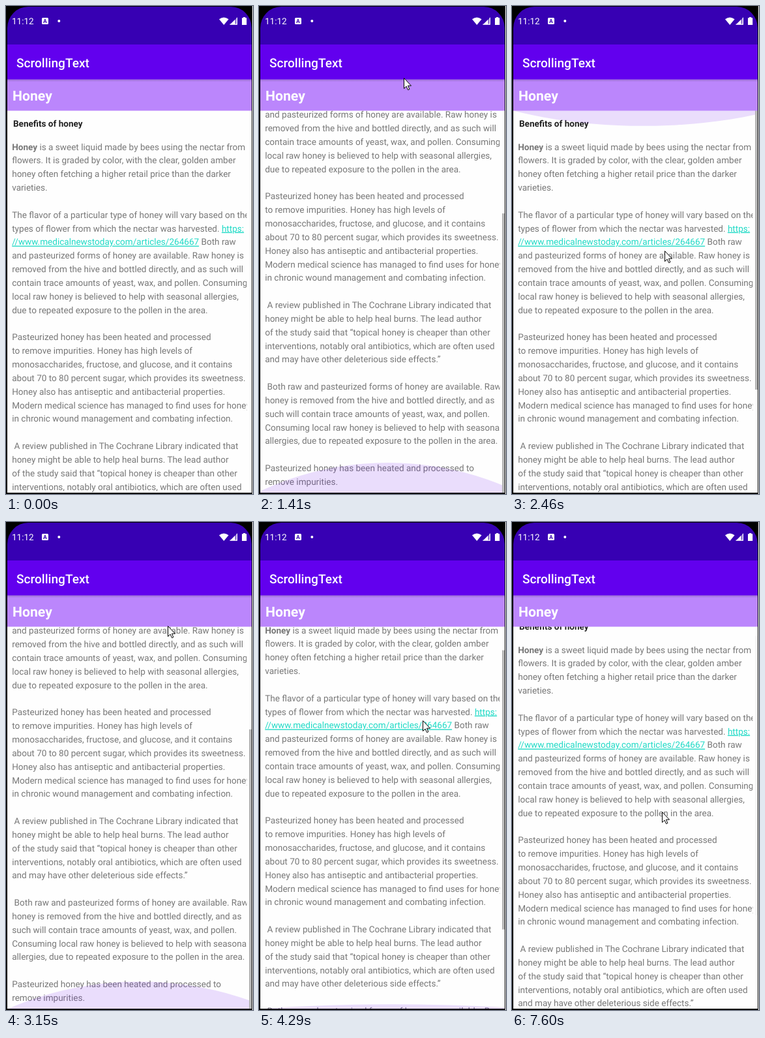
These frames come from a looping animation (379 by 748 pixels, 8 s). An HTML page:

```html
<!DOCTYPE html>
<html lang="en">
<head>
<meta charset="utf-8">
<title>ScrollingText</title>
<style>
  html, body { margin: 0; width: 100%; height: 100%; overflow: hidden; background: #fff; }
  svg { display: block; width: 379px; height: 748px; }
  text { font-family: Roboto, sans-serif; white-space: pre; text-rendering: geometricPrecision; }
  .body { font-size: 13.55px; fill: #777; }
  .bold { font-weight: 700; }
  .link { fill: #1fdac6; text-decoration: underline 1px; text-underline-offset: 1.2px; text-decoration-skip-ink: none; }
</style>
</head>
<body>
<svg viewBox="0 0 379 748">
  <defs>
    <clipPath id="view"><rect x="2" y="160" width="375" height="586"/></clipPath>
    <clipPath id="column"><rect x="2" y="0" width="367.4" height="1000"/></clipPath>
    <linearGradient id="shade" x2="0" y2="1">
      <stop offset="0" stop-opacity=".16"/><stop offset="1" stop-opacity="0"/>
    </linearGradient>
  </defs>
  <rect width="378" height="748"/>
  <rect x="2" y="100" width="375" height="646" fill="#fefefe"/>

  <g clip-path="url(#view)">
    <g id="content">
      <text class="bold" x="11" y="185" font-size="13.5" fill="#212121">Benefits of honey</text>
      <g id="lines" clip-path="url(#column)"></g>
    </g>
    <ellipse id="glow" rx="400" fill="#6200ee" opacity=".13"/>
    <rect id="bar" x="373" width="4" height="428" fill="#b5b5b5"/>
  </g>

  <path d="M2 60V34A32 33 0 0 1 34 1H345A32 33 0 0 1 377 34V60Z" fill="#3700b3"/>
  <rect x="2" y="59" width="375" height="54" fill="#6200ee"/>
  <rect x="2" y="112.5" width="375" height="48" fill="#bb86fc"/>
  <rect x="2" y="112.5" width="375" height="4" fill="url(#shade)"/>
  <g fill="#fff">
    <text x="9" y="28" font-size="13.5">11:12</text>
    <rect x="55" y="18" width="10" height="10" rx="1.5"/>
    <text x="57" y="26.2" font-size="8.5" font-weight="700" fill="#3700b3">A</text>
    <circle cx="81.3" cy="23" r="2"/>
    <path d="M327 20.3Q334.3 14.7 341.6 20.3L334.3 29Z"/>
    <path d="M343.5 28.8L355 17.3V28.8Z" fill-opacity=".35"/>
    <path d="M343.5 28.8L351.5 20.8V28.8ZM353.6 18.7L355 17.3V28.8H343.5V27.6H353.6Z"/>
    <path d="M362 18.3H364V17H367.2V18.3H369.2V29H362Z"/>
    <text x="16" y="94" font-size="19.1" font-weight="500">ScrollingText</text>
    <text class="bold" x="10" y="145" font-size="21.2">Honey</text>
  </g>

  <path id="cursor" d="M.5 .6V16.5L4.1 13.1L6.6 18.6L8.9 17.6L6.5 12.2H11.5Z"
        fill="#fff" stroke="#000" stroke-width="1"/>
</svg>
<script>
const LOOP = 8000, TICK = 138, LEAD = 35;   // screen refreshes once per tick
const TOP = 160, BOTTOM = 746, MAX = 216;
const PRESS = 8, RELEASE = 33;              // ticks between which the page is dragged
const $ = id => document.getElementById(id);
const clamp = (v, lo, hi) => Math.min(hi, Math.max(lo, v));

// *bold* and [link] mark runs inside a line
const copy = `*Honey* is a sweet liquid made by bees using the nectar from
flowers. It is graded by color, with the clear, golden amber
honey often fetching a higher retail price than the darker
varieties.

The flavor of a particular type of honey will vary based on the
types of flower from which the nectar was harvested. [https:]
[//www.medicalnewstoday.com/articles/264667] Both raw
and pasteurized forms of honey are available. Raw honey is
removed from the hive and bottled directly, and as such will
contain trace amounts of yeast, wax, and pollen. Consuming
local raw honey is believed to help with seasonal allergies,
due to repeated exposure to the pollen in the area.

Pasteurized honey has been heated and processed
to remove impurities. Honey has high levels of
monosaccharides, fructose, and glucose, and it contains
about 70 to 80 percent sugar, which provides its sweetness.
Honey also has antiseptic and antibacterial properties.
Modern medical science has managed to find uses for honey
in chronic wound management and combating infection.

 A review published in The Cochrane Library indicated that
honey might be able to help heal burns. The lead author
of the study said that “topical honey is cheaper than other
interventions, notably oral antibiotics, which are often used
and may have other deleterious side effects.”

 Both raw and pasteurized forms of honey are available. Raw
honey is removed from the hive and bottled directly, and as
such will contain trace amounts of yeast, wax, and pollen.
Consuming local raw honey is believed to help with seasonal
allergies, due to repeated exposure to the pollen in the area.

Pasteurized honey has been heated and processed to
remove impurities.`;

function add(parent, tag, attrs, text) {
  const el = document.createElementNS("http://www.w3.org/2000/svg", tag);
  set(el, attrs);
  if (text) el.textContent = text;
  return parent.appendChild(el);
}

function set(el, attrs) {
  for (const key in attrs) el.setAttribute(key, attrs[key]);
}

copy.split("\n").forEach((line, i) => {
  const row = add($("lines"), "text", { class: "body", x: 9.2, y: 220.6 + i * 20.84 });
  for (const run of line.match(/\*[^*]+\*|\[[^\]]+\]|[^*[]+/g) || []) {
    const kind = { "*": "bold", "[": "link" }[run[0]];
    add(row, "tspan", kind ? { class: kind } : {}, kind ? run.slice(1, -1) : run);
  }
});

// turning points of the pointer: tick, x, y
const path = [
  [3, 204, 599], [4, 204, 591], [8, 205, 582], [10, 222, 110], [12, 222, 106],
  [14, 222, 119], [21, 242, 537], [23, 248, 159], [25, 249, 124], [27, 249, 124],
  [31, 251, 304], [33, 250, 336.5], [37, 245, 347], [47, 245, 347],
  [50, 225, 524], [52, 225, 522], [55, 230, 444]
];

function pointer(tick) {
  const i = path.findLastIndex(p => p[0] <= tick);
  if (i < 0) return [0, -50];
  const a = path[i], b = path[i + 1] || a;
  const u = a === b ? 0 : (tick - a[0]) / (b[0] - a[0]);
  const ease = (1 - Math.cos(Math.PI * u)) / 2;
  return [1, 2].map(k => a[k] + (b[k] - a[k]) * ease);
}

// The page follows the pointer; pushing past an end feeds a glow that fades again.
function scroll(tick) {
  let offset = 0, glow = 0, side = 1;
  for (let k = PRESS + 1; k <= tick; k++) {
    const drag = k <= RELEASE ? .922 * (pointer(k - 1)[1] - pointer(k)[1]) : 0;
    const wanted = offset + drag;
    offset = clamp(wanted, 0, MAX);
    const over = wanted - offset;
    if (over) {
      if (Math.sign(over) !== side) glow = 0;
      side = Math.sign(over);
      glow += (1 - glow) * Math.abs(over) / (Math.abs(over) + 40);
    } else {
      glow = glow < .1 ? 0 : glow * .72;
    }
  }
  return { offset: Math.round(offset), glow, side };
}

function draw() {
  const tick = Math.floor((performance.now() % LOOP + LEAD) / TICK);
  const [x, y] = pointer(tick).map(Math.round);
  const { offset, glow, side } = scroll(tick);

  set($("cursor"), { transform: `translate(${x} ${y})` });
  set($("content"), { transform: `translate(0 ${-offset})` });
  set($("bar"), {
    y: TOP + offset * (BOTTOM - TOP) / (BOTTOM - TOP + MAX),
    opacity: tick > PRESS ? clamp(1 - .3 * (tick - RELEASE - 1), .1, 1) : 0
  });
  set($("glow"), {
    cx: 190 + (x - 190) / 4,
    cy: (side > 0 ? BOTTOM : TOP) + side * 346 * glow,
    ry: 400 * glow
  });
  requestAnimationFrame(draw);
}
draw();
</script>
</body>
</html>
```
